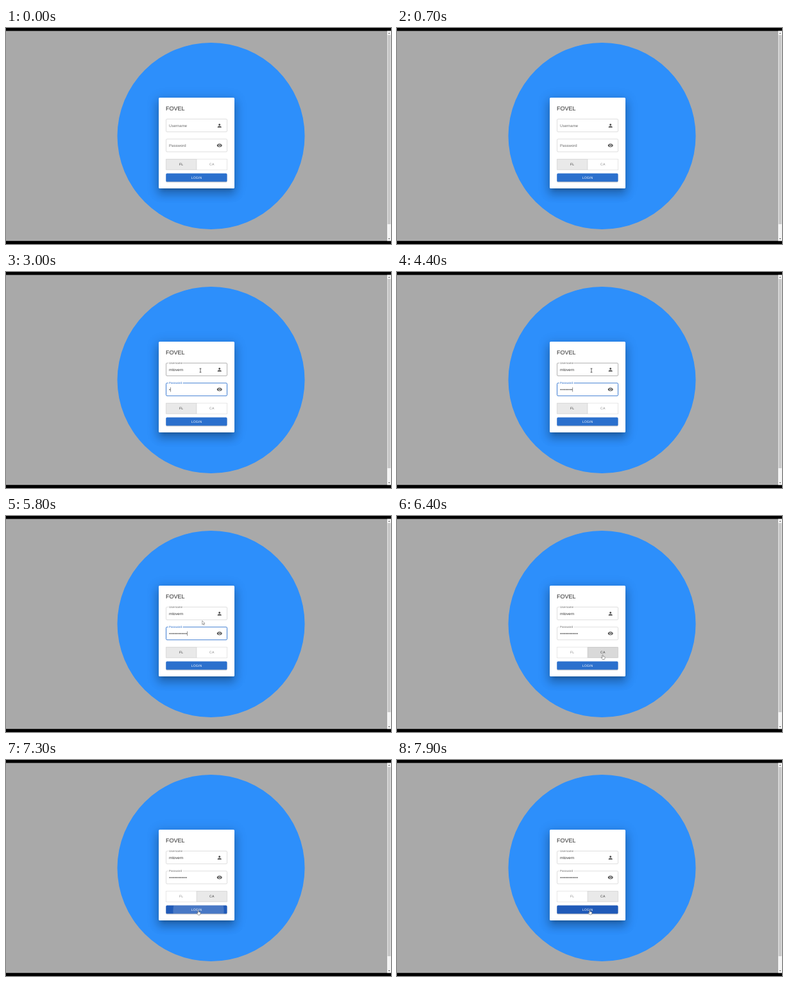
An HTML page for the animation above (8 s loop, 600 by 338 pixels).

```html
<!DOCTYPE html>
<html lang="en">
<head>
<meta charset="utf-8">
<title>Login form</title>
<style>
  html, body { margin: 0; width: 600px; height: 338px; overflow: hidden; background: #000; }
  #card {
    position: absolute; left: 238px; top: 109px; width: 118px; height: 142px;
    border-radius: 1.5px; background: #fff;
    box-shadow: 0 4.1px 5.6px -2.6px rgba(0,0,0,.2), 0 9px 14px 1px rgba(0,0,0,.18), 0 3.4px 17px 3px rgba(0,0,0,.15);
  }
  svg { position: absolute; left: 0; top: 0; }
  text {
    font-family: "Liberation Sans", Arial, sans-serif; font-size: 6px; fill: #333;
    letter-spacing: .05px; text-rendering: geometricPrecision; white-space: pre;
  }
  .title { font-size: 9px; letter-spacing: 0; fill: #2b2b2b; }
  .button { font-size: 5.1px; letter-spacing: .14px; text-anchor: middle; }
  .icon { fill: #505050; }
</style>
</head>
<body>
<svg width="600" height="338" viewBox="0 0 600 338">
  <rect y="4.6" width="600" height="328.6" fill="#a9a9a9"/>
  <circle cx="319.5" cy="169" r="146" fill="#2d8ffb"/>
  <rect x="594" y="4.6" width="6" height="328.6" fill="#f4f4f4"/>
  <rect x="594.6" y="11" width="4.8" height="296" fill="#c8c8c8"/>
  <path d="M595.7 9l1.4-1.8 1.4 1.8zM595.7 329l1.4 1.8 1.4-1.8z" fill="#606060"/>
</svg>
<div id="card"></div>
<svg width="600" height="338" viewBox="0 0 600 338">
  <defs>
    <clipPath id="buttonClip"><rect x="249.3" y="227.5" width="95.2" height="13" rx="1.5"/></clipPath>
  </defs>
  <text class="title" x="249" y="128.8">FOVEL</text>
  <g id="fields"></g>
  <path class="icon" transform="translate(328.2 148.2) scale(.375)"
    d="M12 12a4 4 0 1 0 0-8 4 4 0 0 0 0 8zm0 2c-2.7 0-8 1.3-8 4v2h16v-2c0-2.7-5.3-4-8-4z"/>
  <path class="icon" fill-rule="evenodd" transform="translate(328.2 179.3) scale(.375)"
    d="M12 4.5C7 4.5 2.7 7.6 1 12c1.7 4.4 6 7.5 11 7.5s9.3-3.1 11-7.5c-1.7-4.4-6-7.5-11-7.5zM12 17a5 5 0 1 1 0-10 5 5 0 0 1 0 10zm0-8a3 3 0 1 0 0 6 3 3 0 0 0 0-6z"/>
  <rect id="flFill" x="249.4" y="205" width="47.6" height="17" rx="1.2"/>
  <rect id="caFill" x="297" y="205" width="47.5" height="17" rx="1.2"/>
  <path d="M249.4 205.2h95.1v16.8h-95.1zM297 205.2v16.8" fill="none" stroke="#000" stroke-opacity=".2" stroke-width=".5"/>
  <text id="fl" class="button" x="273" y="214.9">FL</text>
  <text id="ca" class="button" x="320.8" y="214.9">CA</text>
  <rect x="249.3" y="228.4" width="95.2" height="13" rx="1.5" fill="#000" opacity=".22"/>
  <rect id="login" x="249.3" y="227.5" width="95.2" height="13" rx="1.5"/>
  <circle id="ripple" cx="300" cy="236" fill="#fff" clip-path="url(#buttonClip)"/>
  <text class="button" x="297" y="235.7" style="fill:#fff">LOGIN</text>
  <g id="cursor">
    <path id="ibeam" d="M-1.4-3h2.8M-1.4 3h2.8M0-3v6" fill="none" stroke="#222" stroke-width=".7"/>
    <path id="arrow" d="M0 0v6l1.4-1.3 1 2.2 1-.4-1-2.2h1.9z" fill="#fff" stroke="#222" stroke-width=".4"/>
    <path id="hand" d="M-.6.5q.6-.9 1.2 0v2.2l2.6.6q.6.2.5 1l-.5 2.3-.5.9h-2.8l-2.2-2.8q.2-.8 1.1-.3l.6.5z"
      fill="#fff" stroke="#333" stroke-width=".45"/>
  </g>
</svg>
<script>
const LOOP = 8000, TICK = 100;
const BLUE = '#2b70cd';
const $ = id => document.getElementById(id);

const FOCUS_USER = 1000, FOCUS_PASS = 2700, PICK_CA = 6200, PRESS = 7100, RELEASE = 7300;
const userKeys = [1800, 1900, 2000, 2100, 2200, 2300, 2400];
const passKeys = [3000, 3300, 3400, 3600, 3800, 3900, 4000, 4100, 4300, 4600, 4800, 5000, 5300];
// time, x, y
const cursorPath = [
  [900, 303, 154], [5700, 303, 154], [6100, 320.5, 217], [6400, 320.5, 217],
  [6600, 319, 234], [6800, 316, 273], [7100, 299.5, 235], [7300, 299.5, 235], [7500, 300.3, 234.5]
];

const clamp = v => Math.min(1, Math.max(0, v));
const ease = v => v * v * (3 - 2 * v);
const progress = (t, start, length) => ease(clamp((t - start) / length));
const inside = (p, x1, y1, x2, y2) => !!p && p.x >= x1 && p.x <= x2 && p.y >= y1 && p.y <= y2;
const set = (el, attrs) => { for (const k in attrs) el.setAttribute(k, attrs[k]); };

function add(parent, tag, attrs) {
  const el = document.createElementNS('http://www.w3.org/2000/svg', tag);
  set(el, attrs);
  return parent.appendChild(el);
}

function makeField(name, top, value, keys, focusAt, blurAt) {
  const g = $('fields');
  const box = add(g, 'rect', { x: 249.5, y: top, width: 95, height: 20, rx: 1.5, fill: 'none' });
  const notch = add(g, 'rect', { x: 252.6, y: top - 1, width: 23, height: 2, fill: '#fff' });
  const label = add(g, 'text', {});
  const input = add(g, 'text', { x: 254.1, y: top + 12.2 });
  const caret = add(g, 'rect', { y: top + 6.7, width: .5, height: 7, fill: '#222' });
  label.textContent = name;

  return (t, p) => {
    const focused = t >= focusAt && t < blurAt;
    const hover = inside(p, 249.5, top, 344.5, top + 20);
    const up = progress(t, focusAt, 200);
    set(box, {
      stroke: focused ? BLUE : '#000',
      'stroke-opacity': focused ? 1 : hover ? .6 : .25,
      'stroke-width': focused ? .9 : .5
    });
    notch.style.opacity = up > .5 ? 1 : 0;
    label.setAttribute('transform', `translate(254 ${top + 12.2 - 10.7 * up}) scale(${1 - .25 * up})`);
    label.style.fill = focused ? BLUE : '#6a6a6a';
    input.textContent = value.slice(0, keys.filter(k => k <= t).length);
    caret.style.opacity = focused ? 1 : 0;
    caret.setAttribute('x', 254.2 + (input.textContent ? input.getComputedTextLength() : 0));
  };
}

const fields = [
  makeField('Username', 142.5, 'mtovern', userKeys, FOCUS_USER, FOCUS_PASS),
  makeField('Password', 173.8, '•'.repeat(passKeys.length), passKeys, FOCUS_PASS, PICK_CA)
];

function cursorAt(t) {
  if (t < cursorPath[0][0]) return null;
  const i = cursorPath.findIndex(k => k[0] > t);
  if (i < 0) {
    const [, x, y] = cursorPath[cursorPath.length - 1];
    return { x, y };
  }
  const [t0, x0, y0] = cursorPath[i - 1], [t1, x1, y1] = cursorPath[i];
  const f = ease((t - t0) / (t1 - t0));
  return { x: x0 + (x1 - x0) * f, y: y0 + (y1 - y0) * f };
}

function drawToggle(id, selected, hover) {
  set($(id + 'Fill'), { 'fill-opacity': selected ? (hover ? .15 : .085) : hover ? .04 : 0 });
  $(id).style.fill = selected ? '#333' : '#858585';
}

function draw(t) {
  const p = cursorAt(t);
  fields.forEach(f => f(t, p));

  const overFl = inside(p, 249, 205, 297, 222), overCa = inside(p, 297, 205, 345, 222);
  const overLogin = inside(p, 249, 227, 345, 241);
  drawToggle('fl', t < PICK_CA, overFl);
  drawToggle('ca', t >= PICK_CA, overCa);
  set($('login'), { fill: overLogin ? '#205ab8' : BLUE });
  set($('ripple'), {
    r: 95 * progress(t, PRESS, 450),
    opacity: t < PRESS ? 0 : .18 * (1 - progress(t, RELEASE, 550))
  });

  $('cursor').style.display = p ? '' : 'none';
  if (!p) return;
  set($('cursor'), { transform: `translate(${p.x} ${p.y})` });
  const overField = inside(p, 249, 142, 345, 163) || inside(p, 249, 173, 345, 194);
  const shape = overField ? 'ibeam' : overFl || overCa || overLogin ? 'hand' : 'arrow';
  for (const id of ['ibeam', 'arrow', 'hand']) $(id).style.display = id === shape ? '' : 'none';
}

const start = performance.now();
function loop() {
  const t = (performance.now() - start) % LOOP;
  draw(Math.floor(t / TICK) * TICK);
  requestAnimationFrame(loop);
}
loop();
</script>
</body>
</html>
```
